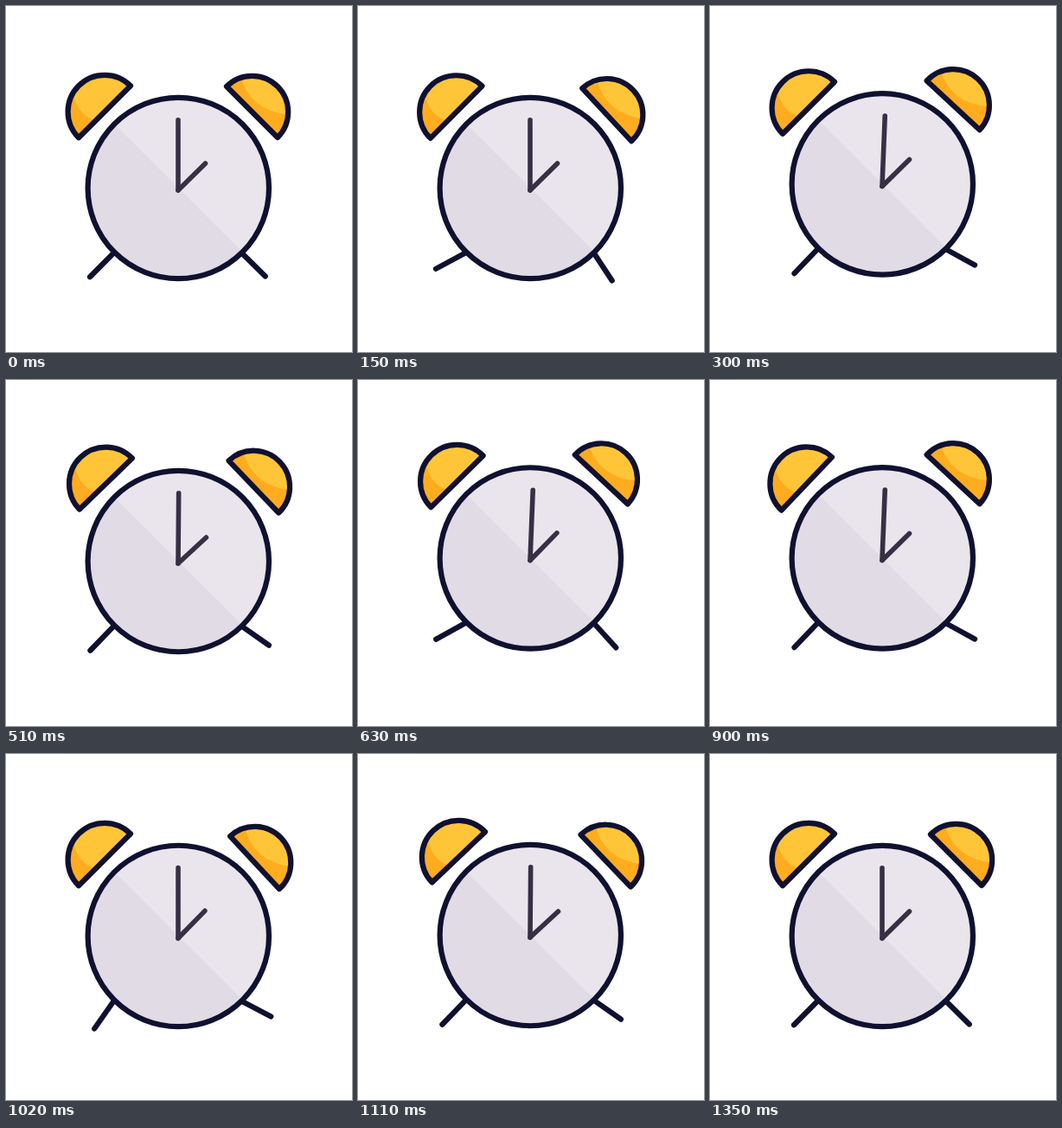
Recreate the animation shown at these times as an HTML page. Size 400 px wide and 400 px high, loop 3.41 s.

```html
<!DOCTYPE html>
<html lang="en">
<head>
<meta charset="utf-8">
<title>Alarm clock</title>
<style>
  html, body { margin: 0; width: 100%; height: 100%; overflow: hidden; background: #fff; }
  svg { display: block; width: 100%; height: 100%; }
  .line { fill: none; stroke: #101130; stroke-width: 6.2; stroke-linecap: round; stroke-linejoin: round; }
  .hand { stroke: #353044; stroke-width: 5.6; }
</style>
</head>
<body>
<svg viewBox="0 0 400 400">
  <defs>
    <path id="domeL" d="M144 92.3A42.4 42.4 0 0 0 84 152.3Z"/>
    <path id="domeR" d="M255 93A41.7 41.7 0 0 1 314 152Z"/>
    <clipPath id="clipL"><use href="#domeL"/></clipPath>
    <clipPath id="clipR"><use href="#domeR"/></clipPath>
  </defs>
  <g id="clock">
    <path id="legL" class="line" d="M125 285L97 313.3"/>
    <path id="legR" class="line" d="M273 286L299.8 312.5"/>
    <g id="bellL">
      <use href="#domeL" fill="#ffc538"/>
      <path clip-path="url(#clipL)" fill="#ffac1f" d="M60 98L78 102Q83 128 108 134L84 170H60Z"/>
      <use href="#domeL" class="line"/>
    </g>
    <g id="bellR">
      <use href="#domeR" fill="#ffc538"/>
      <path clip-path="url(#clipR)" fill="#ffac1f" d="M240 70L271 80Q281 121 328 126V170H240Z"/>
      <use href="#domeR" class="line"/>
    </g>
    <circle cx="199.3" cy="210.5" r="104.7" fill="#eae5ec"/>
    <path fill="#e1dbe5" d="M125.3 136.5A104.7 104.7 0 0 0 273.3 284.5Z"/>
    <circle class="line" cx="199.3" cy="210.5" r="104.7"/>
    <path id="minute" class="line hand" d="M199 213V131.7"/>
    <path id="hour" class="line hand" d="M199 213L230.5 182"/>
  </g>
</svg>
<script>
const LOOP = 3410, STEP = 30, LAST = 45, BEAT = 5;
const TURN = 2 * Math.PI;
const LEG_POSES = [16, 17, -1, -12]; // degrees, one per beat

const $ = id => document.getElementById(id);
const ease = x => x < 0.5 ? 8 * x ** 4 : 1 - 8 * (1 - x) ** 4;

// Height of the hop, 0 to 1: rests for one beat, then peaks every second beat.
const hop = t => t < BEAT ? 0 : ease(1 - Math.abs((t / BEAT + 1) % 2 - 1));

function legAngle(t) {
  const beat = Math.floor(t / BEAT), x = t / BEAT - beat;
  const a = LEG_POSES[beat % 4], b = LEG_POSES[(beat + 1) % 4];
  return a + (b - a) * x;
}

function rotate(id, angle, x, y) {
  $(id).setAttribute("transform", `rotate(${angle} ${x} ${y})`);
}

function draw(now) {
  const t = Math.min(LAST, Math.floor(now % LOOP / STEP));
  const fade = Math.min(1, t / BEAT, (LAST - t) / BEAT);
  const up = hop(t);
  $("clock").setAttribute("transform", `translate(0 ${-4.6 * up})`);
  rotate("legL", fade * legAngle(t), 125, 285);
  rotate("legR", -fade * legAngle(t + 2 * BEAT), 273, 286);
  rotate("bellL", fade * t / 18 * Math.cos(TURN * (t - 16) / 24), 199, 211);
  rotate("bellR", fade * (2.1 - 4.2 * up), 199, 211);
  rotate("minute", 2.3 * up, 199, 213);
  rotate("hour", -1.9 * fade * Math.sin(TURN * t / 10), 199, 213);
}

let start;
function tick(now) {
  start ??= now;
  draw(now - start);
  requestAnimationFrame(tick);
}
draw(0);
requestAnimationFrame(tick);
</script>
</body>
</html>
```
